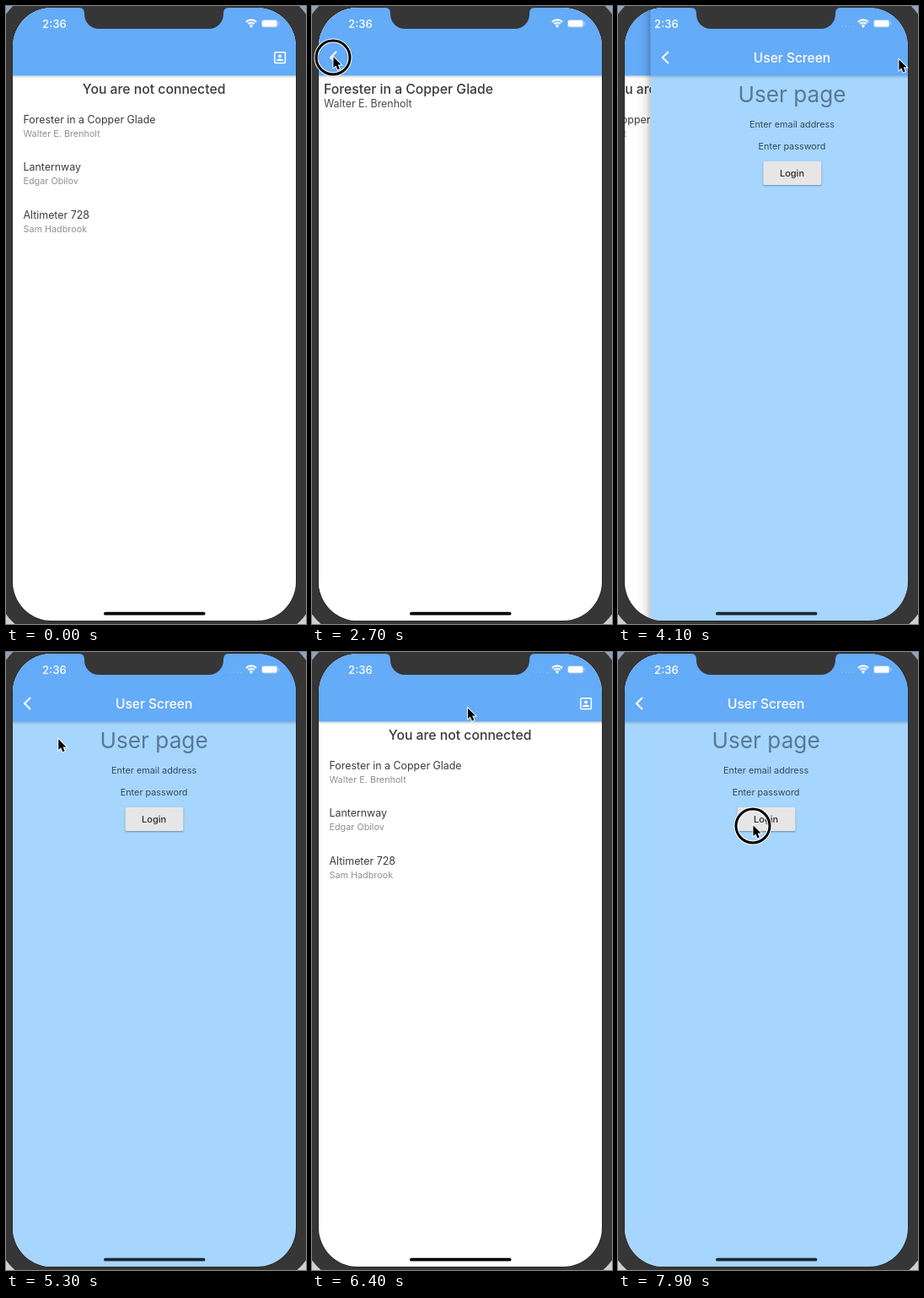
Write an HTML page with a canvas that moves like this. It is 356 px wide and 732 px high and loops after 8000 ms.

```html
<!DOCTYPE html>
<html lang="en">
<head>
<meta charset="utf-8">
<title>Book list</title>
<style>
  html, body { margin: 0; width: 100%; height: 100%; overflow: hidden; }
  canvas { display: block; }
</style>
</head>
<body>
<canvas id="stage" width="356" height="732"></canvas>
<script>
const ctx = document.getElementById('stage').getContext('2d');
const LOOP = 8000, LEFT = 8, TOP = 2, WIDTH = 336, HEIGHT = 726, MIDDLE = 175.6;
const BAR = '#64abf8', BEZEL = '#363636';

const books = [
  ['Forester in a Copper Glade', 'Walter E. Brenholt'],
  ['Lanternway', 'Edgar Obilov'],
  ['Altimeter 728', 'Sam Hadbrook'],
];

// Each visit to a page: slide in, then optionally slide back out.
const visits = [
  { page: drawBook, push: 1500, pushTime: 226, pop: 2840 },
  { page: drawUser, push: 3910, pushTime: 400, pop: 5800 },
  { page: drawUser, push: 6930, pushTime: 400, pop: Infinity },
];
const POP_TIME = 400;

// Pointer path: time, x, y
const path = [
  [300, 349, 300], [1000, 97, 147], [2000, 97, 147], [2600, 25, 60], [3020, 25, 60],
  [3300, 218, 69], [3600, 326, 62], [3900, 333, 63], [4650, 333, 63], [5300, 62, 103],
  [5550, 25, 61], [6050, 25, 61], [6400, 184, 66], [6720, 326, 62], [7250, 326, 62],
  [7750, 160, 205], [8000, 160, 205],
];
const clicks = [[1080, 1300], [2680, 2840], [3680, 3860], [5640, 5800], [6780, 6930], [7820, 8000]];

const clamp = v => Math.max(0, Math.min(1, v));

// cubic-bezier(.35, .91, .33, .97)
function ease(x) {
  if (x <= 0 || x >= 1) return clamp(x);
  const bezier = (a, b, s) => 3 * a * s * (1 - s) ** 2 + 3 * b * (1 - s) * s * s + s ** 3;
  let lo = 0, hi = 1;
  for (let i = 0; i < 20; i++) {
    const s = (lo + hi) / 2;
    if (bezier(.35, .33, s) < x) lo = s; else hi = s;
  }
  return bezier(.91, .97, lo);
}

function text(string, x, y, size, color, weight = 400, align = 'left') {
  ctx.font = `${weight} ${size}px Inter, sans-serif`;
  ctx.fillStyle = color;
  ctx.textAlign = align;
  ctx.fillText(string, x, y);
}

function rect(x, y, w, h, color, radius = 0) {
  ctx.fillStyle = color;
  ctx.beginPath();
  ctx.roundRect(x, y, w, h, radius);
  ctx.fill();
}

function stroke(width, color) {
  ctx.lineWidth = width;
  ctx.strokeStyle = color;
  ctx.stroke();
}

function circle(x, y, r) {
  ctx.beginPath();
  ctx.arc(x, y, r, 0, Math.PI * 2);
}

function gradient(x0, y0, x1, y1, ...colors) {
  const g = ctx.createLinearGradient(x0, y0, x1, y1);
  colors.forEach((color, i) => g.addColorStop(i / (colors.length - 1), color));
  return g;
}

const black = alpha => `rgba(0,0,0,${alpha})`;

function drawPage(background) {
  rect(LEFT, TOP, WIDTH, HEIGHT, background);
  rect(LEFT, 82.5, WIDTH, 4, gradient(0, 82.5, 0, 86.5, black(.22), black(.06), black(0)));
  rect(LEFT, TOP, WIDTH, 80.5, BAR);
}

function drawBack() {
  ctx.beginPath();
  ctx.moveTo(29, 54);
  ctx.lineTo(22, 61);
  ctx.lineTo(29, 68);
  stroke(2, '#fff');
}

function drawList(t, covered) {
  drawPage('#fff');
  ctx.beginPath();
  ctx.roundRect(318.8, 54.8, 12.6, 12.6, 1);
  stroke(1.5, '#fff');
  ctx.fillStyle = '#fff';
  circle(325, 59.3, 1.9);
  ctx.fill();
  ctx.beginPath();
  ctx.ellipse(325, 65, 4, 2.4, 0, Math.PI, 0);
  ctx.fill();
  if (t > 1150 && t < 1700) {
    const x = covered ? 130 : LEFT;
    rect(x, 114, LEFT + WIDTH - x, 57, black(.06));
  }
  text('You are not connected', MIDDLE, 104, 15.75, '#3a3a3a', 500, 'center');
  books.forEach(([title, author], i) => {
    text(title, 20.5, 139 + i * 56.4, 12.4, '#3c3c3c');
    text(author, 20.5, 155 + i * 56.4, 10.8, '#8f8f8f');
  });
}

function drawBook() {
  drawPage('#fff');
  drawBack();
  text(books[0][0], 14, 104, 15.75, '#3a3a3a', 500);
  text(books[0][1], 14, 119.5, 12.4, '#4a4a4a');
}

function drawUser() {
  drawPage('#a6d6fd');
  drawBack();
  text('User Screen', MIDDLE, 66.5, 15.5, '#fff', 500, 'center');
  text('User page', MIDDLE, 114, 26.2, '#587896', 400, 'center');
  text('Enter email address', MIDDLE, 144, 10.85, '#35495b', 400, 'center');
  text('Enter password', MIDDLE, 170, 10.85, '#35495b', 400, 'center');
  ctx.shadowColor = black(.35);
  ctx.shadowBlur = 2;
  ctx.shadowOffsetY = 1;
  rect(141.5, 184, 69, 28, '#e6e6e7', 1.5);
  ctx.shadowColor = 'transparent';
  text('Login', MIDDLE, 202, 11, '#2c2c2c', 500, 'center');
}

function shifted(dx, draw) {
  ctx.save();
  ctx.translate(dx, 0);
  draw();
  ctx.restore();
}

function drawStatus(t) {
  text('2:36', 43, 25.7, 13.2, '#fff', 500);
  if (t >= 2900) for (let i = 0; i < 4; i++) rect(265 + i * 4.4, 23.5, 1.5, 1.5, 'rgba(255,255,255,.2)');
  for (const r of [2, 5.3, 8.6]) {
    ctx.beginPath();
    ctx.arc(291, 25, r, -Math.PI * .75, -Math.PI * .25);
    stroke(2.1, '#fff');
  }
  circle(291, 24.2, 1.3);
  ctx.fillStyle = '#fff';
  ctx.fill();
  rect(303, 16, 19.5, 9.5, 'rgba(255,255,255,.3)', 3);
  rect(304, 17, 17.5, 7.5, '#fff', 2);
  rect(323.2, 19, 1.2, 3.5, 'rgba(255,255,255,.4)', 1);
}

function drawNotch() {
  ctx.beginPath();
  ctx.moveTo(87, 0);
  ctx.lineTo(87, 2);
  ctx.quadraticCurveTo(93, 2, 93, 9);
  ctx.arcTo(93, 27, 111, 27, 17);
  ctx.arcTo(258, 27, 258, 9, 17);
  ctx.lineTo(258, 9);
  ctx.quadraticCurveTo(258, 2, 264, 2);
  ctx.lineTo(264, 0);
  ctx.fillStyle = BEZEL;
  ctx.fill();
}

function drawPointer(t) {
  const next = path.findIndex(key => key[0] > t);
  if (next < 1) return;
  const [t0, x0, y0] = path[next - 1], [t1, x1, y1] = path[next];
  const k = (t - t0) / (t1 - t0);
  const x = x0 + (x1 - x0) * k, y = y0 + (y1 - y0) * k;
  if (clicks.some(([from, to]) => t >= from && t < to)) {
    circle(x, y + 1, 20);
    stroke(5, '#fff');
    stroke(3, '#000');
  }
  ctx.save();
  ctx.translate(x, y);
  ctx.scale(.93, .93);
  ctx.beginPath();
  for (const [px, py] of [[.5, .5], [.5, 14], [3.6, 11.2], [6, 16.6], [8.4, 15.6], [6.1, 10.3], [10.3, 10.3]]) ctx.lineTo(px, py);
  ctx.closePath();
  stroke(2, '#fff');
  ctx.fillStyle = '#000';
  ctx.fill();
  ctx.restore();
}

function draw(t) {
  rect(0, 0, 356, 732, gradient(0, 0, 0, 732, '#8fa3bb', '#d0d0d2'));
  rect(-11, -17, 378, 764, BEZEL, 62);

  ctx.save();
  ctx.beginPath();
  ctx.roundRect(LEFT, TOP, WIDTH, HEIGHT, 46);
  stroke(1.5, '#262626');
  ctx.clip();
  const visit = visits.find(v => t >= v.push && t < v.pop + POP_TIME);
  const shown = visit ? ease((t - visit.push) / visit.pushTime) - ease((t - visit.pop) / POP_TIME) : 0;
  shifted(-WIDTH / 3 * shown, () => drawList(t, shown > 0));
  if (shown > 0) {
    shifted(WIDTH * (1 - shown), () => {
      const shadow = gradient(LEFT - 17, 0, LEFT, 0, black(0), black(.02), black(.07), black(.22));
      rect(LEFT - 17, TOP, 17, HEIGHT, shadow);
      visit.page();
    });
  }
  drawStatus(t);
  rect(116, 717.8, 120.5, 3.8, visit && visit.page === drawUser && shown > .5 ? '#1c2a33' : '#000', 2);
  ctx.restore();

  drawNotch();
  drawPointer(t);
}

function tick() {
  draw(performance.now() % LOOP);
  requestAnimationFrame(tick);
}
tick();
</script>
</body>
</html>
```
